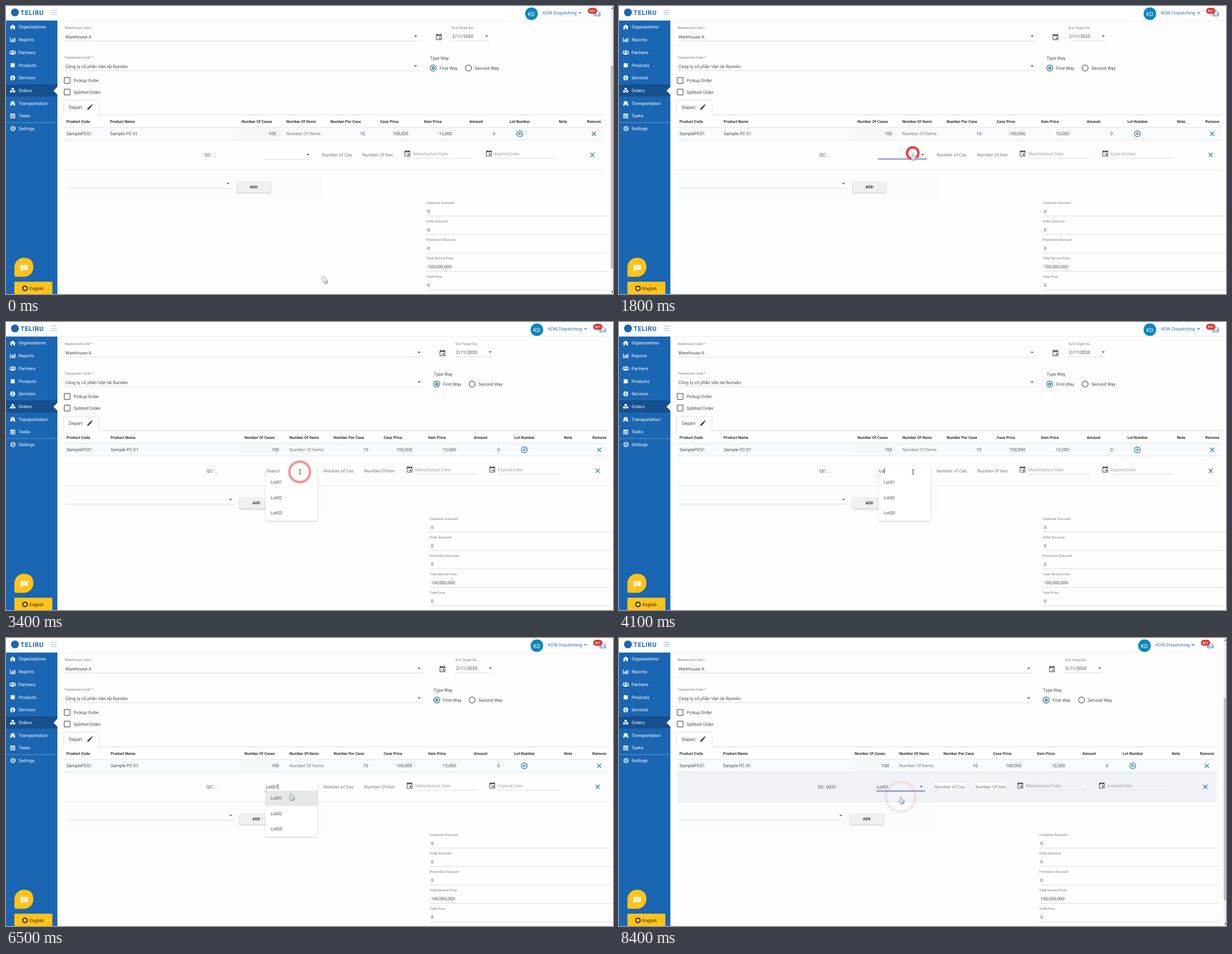
Write an HTML page that moves like this. It is 1087x515 px and loops after 9.2 s.

```html
<!DOCTYPE html>
<html lang="en">
<head>
<meta charset="utf-8">
<title>Order form</title>
<style>
html, body { margin: 0; width: 100%; height: 100%; overflow: hidden; background: #fefefe; }
svg { display: block; width: 100%; height: 100%; }
text { font-family: Roboto, sans-serif; text-rendering: geometricPrecision; white-space: pre; }
</style>
</head>
<body>
<svg viewBox="0 0 1087 515">
  <defs>
    <linearGradient id="skin" x1="0" y1="0" x2="1" y2="1">
      <stop offset="0" stop-color="#fff"/><stop offset=".5" stop-color="#e3e9ec"/><stop offset="1" stop-color="#8f9ba3"/>
    </linearGradient>
    <filter id="lift" x="-20%" y="-20%" width="140%" height="150%">
      <feDropShadow dx="0" dy="1" stdDeviation="1.1" flood-opacity=".32"/>
    </filter>
    <clipPath id="option"><rect x="465" y="273" width="93" height="27.4"/></clipPath>
  </defs>
  <g id="page"></g>
  <g id="side"></g>
  <g id="live"></g>
</svg>
<script>
const LOOP = 9200, BLUE = '#1b66b2', INK = '#484848', HINT = '#777', PALE = '#a2a2a2';
const $ = id => document.getElementById(id);

const text = (x, cy, s, { size = 7.93, fill = INK, weight = 400, anchor = 'start', extra = '' } = {}) =>
  `<text x="${x}" y="${cy + size * .355}" font-size="${size}" fill="${fill}" font-weight="${weight}" text-anchor="${anchor}" ${extra}>${s}</text>`;
const rect = (x, y, w, h, fill, extra = '') =>
  `<rect x="${x}" y="${y}" width="${w}" height="${h}" fill="${fill}" ${extra}/>`;
const line = (x1, x2, y, color = '#dcdcdc', w = 1) => rect(x1, y - w / 2, x2 - x1, w, color);
const circle = (x, y, r, fill, extra = '') => `<circle cx="${x}" cy="${y}" r="${r}" fill="${fill}" ${extra}/>`;
const icon = (x, y, d, fill = '#555', extra = '') =>
  `<path transform="translate(${x} ${y})" d="${d}" fill="${fill}" fill-rule="evenodd" ${extra}/>`;
const stroke = (color, w = 1) => `stroke="${color}" stroke-width="${w}"`;

const small = { size: 5.95, fill: '#777' }, bold = { size: 6.9, fill: '#333', weight: 700 };
const arrow = (x, y) => icon(x, y, 'M-2.8-1.4H2.8L0 1.4z', '#666');
const cross = (x, y) => icon(x, y, 'M-3.6-3.6L3.6 3.6M3.6-3.6L-3.6 3.6', 'none', stroke(BLUE, 1.2));
const calendar = (x, y) =>
  icon(x, y, 'M-5-4.6h1.6v-1.2h1.2v1.2h4.4v-1.2h1.2v1.2H5V5.6H-5zM-3.9-1.9V4.5H3.9V-1.9zM.3.6H3V3.3H.3z');

function sidebar() {
  const white = '#fff';
  const items = [['Organizations', 37.5], ['Reports', 60.3], ['Partners', 83], ['Products', 106], ['Services', 128.6],
    ['Orders', 151], ['Transportation', 173.8], ['Tasks', 196.5], ['Settings', 219.2]];
  const icons = [
    'M-5.3.3L0-4.6 5.3.3H4V4.2H1.1V1H-1.1V4.2H-4V.3z',
    'M-5-4h1v7h9v1H-5zM-3 0h1.4v2.4H-3zM-.9-2.2H.5v4.6H-.9zM1.2-1h1.4v3.4H1.2zM3.3-3.5h1.4v5.9H3.3z',
    'M0-4a2 2 0 010 4 2 2 0 010-4zM-3 4V2.5Q-3 .6-1.5.6h3Q3 .6 3 2.5V4zM-4-3a1.3 1.3 0 010 2.6A1.3 1.3 0 01-4-3zM4-3a1.3 1.3 0 010 2.6A1.3 1.3 0 014-3zM-6 2.4V1.2Q-6 .2-5 .2h1.8Q-3.7 1-3.7 2.4zM6 2.4V1.2Q6 .2 5 .2H3.2Q3.7 1 3.7 2.4z',
    'M-3.6-3.6H3.6V3.6H-3.6z',
    'M0-4.5a4.5 4.5 0 010 9 4.5 4.5 0 010-9zM-.8-2.8V-1.4H.8V-2.8zM-1.2-.6V.4H-.7V2H-1.2V2.9H1.3V2H.8V-.6z',
    'M0-4.8L2.2-3.8V-1.3L0-.3-2.2-1.3V-3.8zM-2.6-.4L-.4.6V3.1L-2.6 4.1-4.8 3.1V.6zM2.6-.4L4.8.6V3.1L2.6 4.1.4 3.1V.6z',
    'M-2.2-4H-.6V-2H.6V-4H2.2L5 4H.8V1H-.8V4H-5z',
    'M-4.3-3.6h1.4v-1.2h1.2v1.2h3.4v-1.2h1.2v1.2h1.4V4.4H-4.3zM-3.4-1.3V.6h1.8v-1.9zM-.8-1.3V.6H.9v-1.9zM1.7-1.3V.6h1.7v-1.9zM-3.4 1.4v2h1.8v-2zM-.8 1.4v2H.9v-2zM1.7 1.4v2h1.7v-2z'];
  return rect(0, 26, 92, 489, BLUE) + rect(0, 140, 92, 22, '#16508f') +
    icon(92, 151.5, 'M0-7L-7 0 0 7z', '#fefefe') + line(0, 92, 208.5, '#5f95cc') +
    items.map(([s, y]) => text(22.5, y, s, { fill: white })).join('') +
    icons.map((d, i) => icon(12, items[i][1], d, white)).join('') +
    circle(12.5, 219.2, 3.2, 'none', stroke(white, 1.1)) + circle(12.5, 219.2, 1.2, 'none', stroke(white, .8)) +
    circle(12.5, 219.2, 4.3, 'none', stroke(white, 1.1) + ' stroke-dasharray="1.7 1.68"') +
    icon(32, 467.3, 'M-17 0A17 17 0 010-17Q17-17 17 0A17 17 0 010 17H-14Q-17 17-17 14z', '#ffc31a') +
    icon(32.5, 468, 'M-5-5H5Q6.5-5 6.5-3.5V2.5Q6.5 4 5 4H-3L-5.5 6.3Q-6.5 6-6.5 4V-3.5Q-6.5-5-5-5zM-4-2.3V-1.3H4V-2.3zM-4 .4V1.4H2V.4z', white) +
    rect(15, 493, 68, 22, '#ffc31a') + circle(34, 505, 4, 'none', stroke('#222', 1.9)) +
    text(42, 505, 'English', { fill: '#222' });
}

// wide: 1 while the scrollbar is gone and the form stretches
function page({ wide, hover, picked, focus }) {
  const X = (x, shift) => x + wide * shift;
  const right = X(1070, 9.5);
  let s = rect(0, 0, 1087, 26, '#fff') + line(0, 1087, 26.5, '#ececec') +
    circle(16, 11.5, 7, BLUE) +
    text(26, 11.7, 'TELIRU', { size: 11.5, fill: BLUE, weight: 700, extra: 'letter-spacing=".6"' }) +
    [7.5, 11.5, 15.5].map(y => line(80, 91, y, '#8fb4dc', .9)).join('') +
    circle(X(941, 9.7), 13.8, 11.3, '#0e86bd') +
    text(X(941, 9.7), 14, 'KD', { size: 10, fill: '#fff', anchor: 'middle' }) +
    text(X(961, 9.7), 12.3, 'KDW Dispatching', { fill: '#2f6fb8' }) +
    icon(X(1028, 10), 12, 'M-2.2-1.1L0 1.1 2.2-1.1', 'none', stroke(BLUE, 1.1)) +
    icon(X(1059, 9.6), 13.2, 'M-5-1L0-5 5-1V4.6H-5zM-5-1L0 2.4 5-1M-5 4.6L-1.6 1.3M5 4.6L1.6 1.3', '#fff', stroke('#2f6fb8', .9)) +
    rect(X(1042, 9.5), 3.2, 16.5, 10.6, '#d3302b', 'rx="5.3"') +
    text(X(1050.2, 9.5), 8.6, '561', { size: 6.6, fill: '#fff', weight: 500, anchor: 'middle' });

  [['Warehouse Code *', 'Warehouse A', 38.5, 55], ['Transporter Code *', 'Công ty cổ phần Vận tải Rumelo', 92, 108]]
    .forEach(([label, value, ly, vy]) => s += text(105, ly, label, small) + text(106.3, vy, value) +
      line(104, X(741, 6), vy + 7.8) + arrow(X(733.5, 6.3), vy - .5));
  s += calendar(X(775.3, 6.3), 55.3) + text(X(798.3, 6.5), 38.5, 'SLA Target Da...', small) +
    text(X(799.3, 6.7), 54, '2/11/2020') + arrow(X(860.7, 6.5), 54) + line(X(797, 6.7), X(865, 6.7), 62.3) +
    text(X(759.3, 6.5), 93.3, 'Type Way');
  [['First Way', 765], ['Second Way', 828.3]].forEach(([label, x]) =>
    s += circle(X(x, 6.4), 111, 5.4, '#fff', stroke('#4b5560', 1.2)) + text(X(x + 11.3, 6.4), 111, label));
  s += circle(X(765, 6.4), 111, 3.1, '#35a9cf');
  [['Pickup Order', 133.2], ['Splitted Order', 154]].forEach(([label, y]) =>
    s += rect(104.3, y - 5.3, 10.4, 10.4, '#fff', stroke('#5a5a5a', 1.2) + ' rx=".8"') + text(121, y, label));

  s += line(167, right, 194.5, '#d8d8d8') +
    icon(103.5, 168.5, 'M0 26.5V0H63V26.5', '#fff', stroke('#dedede', 1)) + text(112.6, 181.5, 'Depart', { size: 8.15 }) +
    icon(150, 181, 'M-4.4 2.4L1.6-3.6 3.6-1.6-2.4 4.4H-4.4zM2.2-4.2L3-5Q3.5-5.3 4-5L5-4Q5.3-3.5 5-3L4.2-2.2z', '#444');

  [['Product Code', 108.3, 0], ['Product Name', 186.3, 1], ['Number Of Cases', 422, 5], ['Number Of Items', 502, 5.5],
   ['Number Per Case', 581, 5.8], ['Case Price', 669.7, 6.5], ['Item Price', 748.6, 7.2], ['Amount', 829.7, 8],
   ['Lot Number', 902, 8.4], ['Note', 990, 9.2], ['Remove', 1040.5, 9.6]]
    .forEach(([label, x, shift]) => s += text(X(x, shift), 207, label, bold));

  s += rect(104, 217, right - 104, 22.5, '#f8fbfd') + line(104, right, 217, '#e2e2e2') +
    rect(X(415, 4.5), 221, X(70, .5), 14, '#f5f8f9') + line(104, right, 239.5, '#e2e6e9') +
    text(108.3, 228, 'SamplePC01') + text(X(186.3, 1.2), 228, 'Sample PC 01') +
    text(X(502, 5.5), 228, 'Number Of Items', { fill: HINT, extra: 'letter-spacing=".06"' });
  [['100', 483.7, 5.3], ['10', 642.6, 6.2], ['100,000', 720.7, 7], ['12,000', 799, 7.2], ['0', 876.3, 8]]
    .forEach(([v, x, shift]) => s += text(X(x, shift), 228, v, { anchor: 'end' }));
  s += icon(X(920, 8.2), 228.5, 'M-5.2 0A5.2 5.2 0 015.2 0 5.2 5.2 0 01-5.2 0M-2.8 0H2.8M0-2.8V2.8', 'none', stroke(BLUE, 1.15)) +
    cross(X(1052.7, 9.7), 228.5);

  if (hover) s += rect(104, 240, right - 104, 52.5, '#f1f3f8');
  s += text(X(356, 3), 265.8, picked ? 'QC: QC01' : 'QC: ...') +
    (focus ? line(X(461, 2.8), X(548, 3), 273.6, '#3f51b5', 1.3) : line(X(461, 2.8), X(548, 3), 274.3)) +
    (picked ? text(X(462.6, 3), 266, 'Lot01') : '') + arrow(X(541, 3), 266);
  [['Number of Cases', 565.5, 3, 54.7], ['Number Of Items', 638, 3.4, 54.5]].forEach(([label, x, shift, w]) =>
    s += `<svg x="${X(x, shift)}" y="259" width="${w}" height="13">${rect(0, 0, w, 13, hover ? '#fff' : '#fefefe')}` +
      text(.2, 6.8, label, { fill: HINT, extra: 'letter-spacing=".06"' }) + '</svg>');
  [['Manufacture Date', 718.7, 4, 836.5, 7], ['Expired Date', 864.7, 6.1, 983.5, 8.5]].forEach(([label, x, shift, end, grow]) =>
    s += calendar(X(x, shift), 263.5) + text(X(x + 10, shift), 264.6, label, { fill: PALE }) +
      line(X(x + 9.5, shift), X(end, grow), 272.2));
  s += cross(X(1050, 9.6), 266) + line(104, right, 292.6, '#e5e5e5') +
    rect(104, 293, X(464, 6), 53, '#fafcfd') + line(109, X(405, 4), 326) + arrow(X(397.3, 5), 317.6) +
    rect(X(414, 4.3), 314, 59.7, 19.5, '#f0f0f0', 'rx="1.2" filter="url(#lift)"') +
    text(X(443.7, 4.4), 323.6, 'ADD', { ...bold, size: 7, anchor: 'middle' });

  ['Customer Discount', 'Order Discount', 'Promotion Discount', 'Total Service Price', 'Total Price'].forEach((label, i) => {
    const y = 351.6 + i * 33;
    s += text(X(752.3, 6.2), y, label, small) + text(X(754.8, 6.2), y + 15.5, i == 3 ? '100,000,000' : '0') +
      line(X(752, 6.2), X(1077, 10), y + 24);
  });
  if (!wide) s += rect(1082.5, 0, 4.5, 515, '#f1f1f1') + rect(1083, 107, 4, 362, '#bfbfbf') +
    icon(1086, 4, 'M-2 1L0-1.4 2 1z', '#555') + icon(1086, 511, 'M-2-1L0 1.4 2-1z', '#555');
  return s;
}

const clamp = v => Math.max(0, Math.min(1, v));
const PATH = [[0, 566, 484], [230, 566, 484], [700, 526, 257], [950, 526, 257], [1100, 526, 263], [2250, 526, 263],
  [2500, 526.5, 268], [5750, 526.5, 268], [6130, 522, 369], [6500, 510, 278], [6700, 504.3, 284], [LOOP, 504.3, 284]];
function pointer(t) {
  const i = PATH.findIndex(p => p[0] > t), [t0, x0, y0] = PATH[i - 1], [t1, x1, y1] = PATH[i];
  const k = (t - t0) / (t1 - t0), e = k * k * (3 - 2 * k);
  return [x0 + (x1 - x0) * e, y0 + (y1 - y0) * e];
}

function cursor(t, x, y) {
  const edge = stroke('#7d8b93', .7);
  if (t < 700 && y > 275)
    return icon(x, y, 'M0 0C4-.8 8 3 10 8.5 10.3 12 7 14 4.6 12.4 2 9.5-.6 4 0 0zM4 12Q8 12 9.8 8.6', 'url(#skin)', edge);
  if (t > 2000 && y < 273)
    return icon(x, y, 'M-2-4H-.4Q0-4 0-3.5 0-4 .4-4H2M0-3.5V3.5M-2 4H-.4Q0 4 0 3.5 0 4 .4 4H2', 'none', stroke('#333', .9));
  return icon(x, y, 'M-.9 0Q0-1.2 1 0L1.4 4.2Q3 3.7 3.8 4.7 5.4 4.5 5.8 6 7 6.3 6.8 8.5 6.6 11 5 13H-.8Q-1.2 11-3.6 8.8-4.4 7-2.8 6.8L-1 8z', 'url(#skin)', edge);
}

const CLICKS = [[1400, 526, 263], [2600, 526, 268], [7200, 504.3, 284]];
function ring([start, x, y], t) {
  let p = (t - start) / 1000;
  if (start > 7000) p = Math.min(p, 1.2);
  if (p <= 0 || p >= 1.3) return '';
  const r = 2 + 20.5 * p, a = Math.min(1, 1.35 * (1 - p / 1.3));
  return `<g opacity="${a}">${circle(x, y, r, 'none', stroke('#e8383866', 5.6))}${circle(x, y, r, 'none', stroke('#e62a2e', 3.4))}</g>`;
}

// key press times with the caret position after each one
const KEYS = [[2600, 466.3], [3700, 471], [4080, 475.2], [4270, 477.8], [5080, 482.4], [5280, 487]];
function panel(t, y) {
  const open = clamp((t - 1850) / 200), shown = open * (1 - clamp((t - 7800) / 150));
  if (!shown) return '';
  const picked = t >= 7500, lots = picked ? ['Lot01'] : ['Lot01', 'Lot02', 'Lot03'];
  const typed = KEYS.filter(k => k[0] <= t).length - 1;
  const over = t > 5750 ? Math.floor((y - 273) / 27.4) : -1;
  const scale = .7 + .3 * open;
  let s = rect(464.8, 259.5, 93.2, 13.5 + 27.4 * lots.length, '#fff', 'filter="url(#lift)"');
  if (over >= 0 && over < lots.length)
    s += rect(465, 273 + over * 27.4, 93, 27.4, t > 7250 ? '#d6d6d6' : '#e7e7e7');
  if (t > 7200) s += circle(504.3, 284, Math.min(60, (t - 7200) * .06), '#000', 'opacity=".14" clip-path="url(#option)"');
  lots.forEach((lot, i) => s += text(474, 286.6 + 27.4 * i, lot, { fill: picked ? '#2b4c9b' : INK }));
  s += typed > 0 ? text(466, 266, 'Lot01'.slice(0, typed), { fill: '#333' }) : text(466, 266, 'Search', { fill: HINT });
  if (typed >= 0 && t < 7300 && Math.floor((t - KEYS[typed][0]) / 530) % 2 == 0)
    s += rect(KEYS[typed][1] - .4, 261, .9, 10, '#222');
  return `<g opacity="${shown}" transform="translate(511 266) scale(${scale}) translate(-511 -266)">${s}</g>`;
}

let drawn = '';
function frame(now) {
  const t = now % LOOP, [x, y] = pointer(t);
  const wide = t >= 1700 && t < 8000 ? 1 : 0;
  const state = { wide, hover: !wide && y > 240 && y < 293, picked: t >= 7500, focus: t >= 1450 };
  const key = JSON.stringify(state);
  if (key != drawn) $('page').innerHTML = page(state);
  drawn = key;
  $('live').innerHTML = panel(t, y) + CLICKS.map(c => ring(c, t)).join('') + cursor(t, x, y);
  requestAnimationFrame(frame);
}
$('side').innerHTML = sidebar();
requestAnimationFrame(frame);
</script>
</body>
</html>
```
